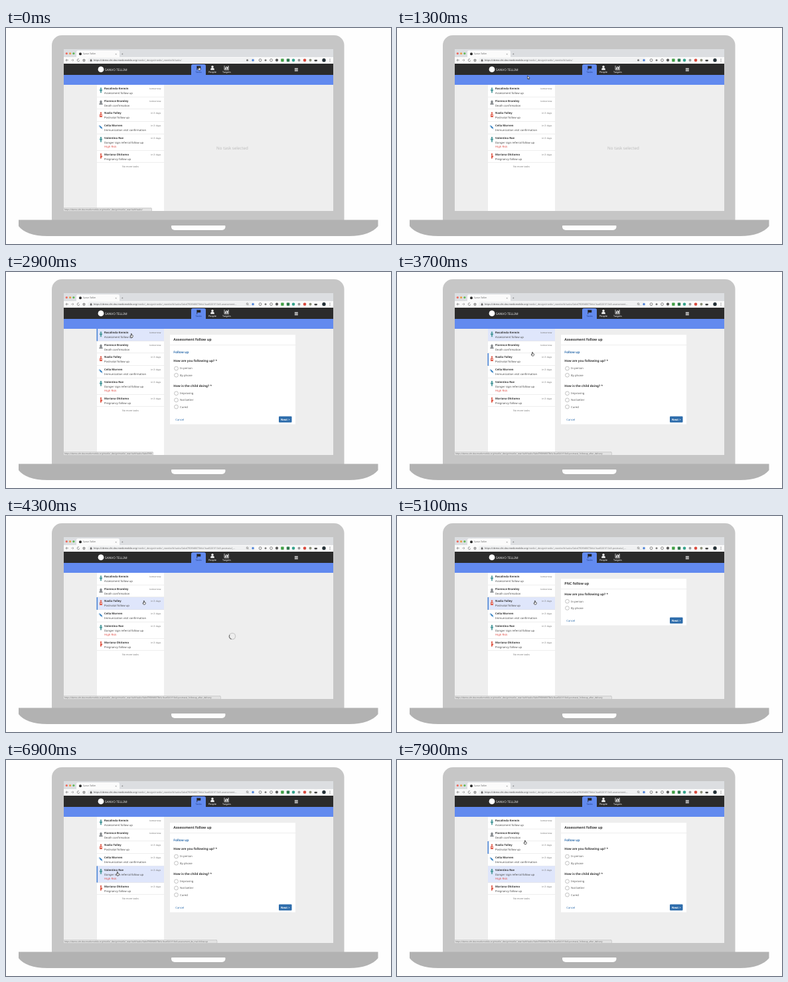
An HTML page with a canvas that plays this animation: 580 px wide and 327 px high, repeating every 8 s.

```html
<!DOCTYPE html>
<html lang="en">
<head>
<meta charset="utf-8">
<title>Task list demo</title>
<style>
html, body { margin: 0; width: 100%; height: 100%; overflow: hidden; background: #fefefe; }
canvas { display: block; width: 580px; height: 327px; }
</style>
</head>
<body>
<canvas id="stage"></canvas>
<script>
const W = 580, H = 327, LOOP = 8000, STEP = 100;
const canvas = document.getElementById('stage');
const dpr = window.devicePixelRatio || 1;
canvas.width = W * dpr;
canvas.height = H * dpr;
const c = canvas.getContext('2d');

const BLUE = '#628aef', LINK = '#2d6cab';
const HOST = 'https://demo-cht.dev.medicmobile.org';
const PATH = '/medic/_design/medic/_rewrite/#/tasks/';
const HASH = '0abd7f08fd8073bfa1bad3201f10c8';

const rows = [
  { y: 86, h: 18.5, name: 'Rosalinda Kerwin', task: 'Assessment follow up', due: 'tomorrow', icon: 'person', color: '#4b9a9c', link: '-assessment-follow-up' },
  { y: 104.5, h: 18.5, name: 'Florence Bramley', task: 'Death confirmation', due: 'tomorrow', icon: 'tomb', color: '#85898d', link: '-death_confirmation' },
  { y: 123, h: 19, name: 'Nadia Tolley', task: 'Postnatal follow up', due: 'in 3 days', icon: 'mother', color: '#e0604f', link: '-postnatal_followup_after_delivery' },
  { y: 142, h: 18.5, name: 'Celia Morven', task: 'Immunization visit confirmation', due: 'in 3 days', icon: 'syringe', color: '#3d86c4', link: '-immunization_visit' },
  { y: 160.5, h: 25, name: 'Valentina Roe', task: 'Danger sign referral follow up', due: 'in 3 days', icon: 'person', color: '#4b9a9c', link: '-assessment_de_mal-follow-up', risk: true },
  { y: 185.5, h: 18.5, name: 'Mariana Okitomo', task: 'Pregnancy follow up', due: 'in 3 days', icon: 'pregnant', color: '#e0604f', link: '-pregnancy_follow_up' }
];

// time, x, y of the pointer
const path = [
  [0, 291, 61], [700, 291, 61], [1300, 198, 75], [1700, 189, 96], [3200, 189, 96],
  [3900, 208, 131], [5200, 208, 131], [5800, 168, 172], [7200, 168, 172], [7900, 193, 124.5]
];

// click time, moment the form is ready, row
const clicks = [
  { at: 2000, ready: 2600, row: 0 },
  { at: 4000, ready: 4700, row: 2 },
  { at: 6200, ready: 6700, row: 4 }
];

function rect(x, y, w, h, fill, r = 0) {
  c.fillStyle = fill;
  c.beginPath();
  c.roundRect(x, y, w, h, r);
  c.fill();
}

function dot(x, y, r, fill) {
  c.fillStyle = fill;
  c.beginPath();
  c.arc(x, y, r, 0, Math.PI * 2);
  c.fill();
}

function ring(x, y, r, color, width, from = 0, to = Math.PI * 2) {
  c.strokeStyle = color;
  c.lineWidth = width;
  c.beginPath();
  c.arc(x, y, r, from, to);
  c.stroke();
}

function line(points, color, width) {
  c.strokeStyle = color;
  c.lineWidth = width;
  c.beginPath();
  points.forEach(([x, y]) => c.lineTo(x, y));
  c.stroke();
}

function shape(points, fill, edge) {
  c.beginPath();
  points.forEach(([x, y]) => c.lineTo(x, y));
  c.closePath();
  c.fillStyle = fill;
  c.fill();
  if (edge) {
    c.strokeStyle = edge;
    c.lineWidth = 0.7;
    c.stroke();
  }
}

// Text is laid out ten times larger so small sizes keep exact spacing.
function text(str, x, y, size, color, { bold = false, align = 'left' } = {}) {
  c.save();
  c.translate(x, y);
  c.scale(0.1, 0.1);
  c.font = `${bold ? 700 : 400} ${size * 10}px "Noto Sans", "Open Sans", sans-serif`;
  c.textRendering = 'geometricPrecision';
  c.textAlign = align;
  c.textBaseline = 'alphabetic';
  c.fillStyle = color;
  c.fillText(str, 0, size * 3.5);
  const width = c.measureText(str).width / 10;
  c.restore();
  return width;
}

function clip(x, y, w, h, draw) {
  c.save();
  c.beginPath();
  c.rect(x, y, w, h);
  c.clip();
  draw();
  c.restore();
}

function pointer(t) {
  let i = path.findIndex(k => k[0] > t);
  if (i < 0) return path[path.length - 1].slice(1);
  const [t0, x0, y0] = path[i - 1], [t1, x1, y1] = path[i];
  const u = (t - t0) / (t1 - t0), e = u * u * (3 - 2 * u);
  return [x0 + (x1 - x0) * e, y0 + (y1 - y0) * e];
}

function laptop() {
  rect(0, 0, W, H, '#fefefe');
  rect(69, 11, 440.5, 280, '#c6c6c6', [15, 15, 0, 0]);
  c.fillStyle = '#b2b2b2';
  c.beginPath();
  c.moveTo(19, 290.5);
  c.lineTo(560.5, 290.5);
  c.lineTo(560.5, 300);
  c.bezierCurveTo(553, 309, 538, 315, 517, 315);
  c.lineTo(62, 315);
  c.bezierCurveTo(41, 315, 26, 309, 19, 300);
  c.fill();
  rect(249, 299, 81.5, 7, '#fefefe', [1, 1, 5, 5]);
}

function browser(selected) {
  rect(87, 32, 406, 12.5, '#dcdee1');
  ['#ed6a5e', '#e8a04a', '#5fb85a'].forEach((col, i) => dot(91.3 + i * 5.3, 38.6, 1.6, col));
  rect(106, 34, 65, 10.5, '#fbfbfb', [2.5, 2.5, 0, 0]);
  dot(112, 39.2, 2, '#2b2b2b');
  text('Sanvo Tellim', 116, 39.2, 3.3, '#555');
  text('×', 164.4, 39.2, 4, '#555');
  text('+', 173.8, 39, 5, '#555');

  rect(87, 44, 406, 10, '#fafafa');
  rect(123, 45, 252, 8, '#f0f1f2', 4);
  const ink = '#555';
  line([[94, 48.7], [90, 48.7]], ink, 0.6);
  line([[91.8, 47], [90, 48.7], [91.8, 50.4]], ink, 0.6);
  line([[98, 48.7], [102, 48.7]], '#888', 0.6);
  line([[100.2, 47], [102, 48.7], [100.2, 50.4]], '#888', 0.6);
  ring(109, 48.7, 1.8, ink, 0.6, 0.2, 5.4);
  line([[115.5, 48.8], [117.5, 46.8], [119.5, 48.8]], ink, 0.6);
  c.strokeRect(116.2, 48.6, 2.6, 2.1);
  rect(126.8, 48.2, 2.6, 2.3, ink);
  ring(128.1, 48.2, 0.9, ink, 0.5, Math.PI, 0);

  const w = text(HOST, 132, 48.7, 3.6, '#444');
  const link = selected ? rows[selected.row].link.slice(0, 11) + '...' : '';
  clip(132, 44, 225, 10, () => text(PATH + (selected ? HASH + link : ''), 132 + w, 48.7, 3.6, '#777'));
  if (selected) {
    ring(363.5, 48.3, 1.3, ink, 0.6);
    line([[364.4, 49.2], [365.5, 50.3]], ink, 0.6);
  } else {
    dot(363.5, 48.7, 1.5, '#777');
  }
  dot(372, 48.7, 1.7, '#4a80d8');

  ring(383, 48.7, 1.9, '#555', 0.7);
  dot(391, 48.7, 1.5, '#777');
  ring(399.5, 48.7, 1.9, '#555', 0.7);
  dot(408, 48.7, 2.1, '#555');
  rect(414.2, 46.5, 4.4, 4.4, '#43a047', 0.7);
  rect(422.8, 46.5, 4.4, 4.4, '#2f7a4d', 0.7);
  dot(433, 48.7, 2.3, '#35a28c');
  dot(441.5, 48.7, 2, '#9a9a9a');
  dot(450, 48.7, 2.3, '#d94a3e');
  dot(458.5, 48.7, 2, '#8a8f78');
  rect(464.5, 48, 4.4, 2.4, '#444', 0.8);
  dot(479, 48.7, 2.7, '#263238');
  [47, 48.7, 50.4].forEach(y => dot(488, y, 0.5, '#555'));
}

function navbar() {
  rect(87, 54, 406, 17.2, '#2b2b2b');
  rect(87, 71, 406, 15, BLUE);
  dot(143, 62.7, 4.4, '#fff');
  text('SANVO TELLIM', 149, 63, 4.8, '#eee');

  rect(279, 55, 22, 17, BLUE, [2.5, 2.5, 0, 0]);
  rect(287.4, 57.3, 0.8, 6.5, '#222');
  rect(288, 57.5, 5.3, 3.9, '#222');
  text('Tasks', 290.2, 66.4, 3.7, '#23418c', { align: 'center' });

  dot(311, 58.8, 1.7, '#fff');
  rect(308.2, 60.4, 5.6, 3.2, '#fff', [2, 2, 0.5, 0.5]);
  text('People', 311, 66.4, 3.7, '#fff', { align: 'center' });

  line([[329, 57], [329, 63.4], [336, 63.4]], '#fff', 0.7);
  [2.8, 4.6, 3.6, 5.3].forEach((h, i) => rect(330 + i * 1.5, 62.6 - h, 1, h, '#fff'));
  text('Targets', 332.3, 66.4, 3.7, '#fff', { align: 'center' });
  [60.8, 62.6, 64.4].forEach(y => rect(434.8, y, 5, 1, '#fff'));
}

function icon(kind, y, col) {
  const x = 143;
  if (kind === 'tomb') {
    rect(x - 1.6, y - 3.2, 3.2, 5, col, [1.6, 1.6, 0, 0]);
    rect(x - 2.6, y + 1.5, 5.2, 1.7, col);
    return;
  }
  if (kind === 'syringe') {
    line([[x - 2.8, y - 2.8], [x + 2.6, y + 2.6]], col, 0.7);
    line([[x - 1.6, y - 1.6], [x + 1.4, y + 1.4]], col, 2.1);
    line([[x - 3, y - 1.6], [x - 1.6, y - 3]], col, 0.7);
    return;
  }
  dot(x, y - 2.9, 1.2, col);
  if (kind === 'mother') {
    rect(x - 2, y - 1.5, 4, 5.2, col, [1.6, 1.6, 0.5, 0.5]);
    dot(x + 0.3, y + 0.8, 0.9, '#fff');
  } else if (kind === 'pregnant') {
    rect(x - 1.1, y - 1.5, 2, 5.4, col, 0.8);
    dot(x + 0.8, y + 0.6, 1.4, col);
  } else {
    rect(x - 2, y - 1.5, 4, 2.5, col, 1);
    rect(x - 1.1, y - 0.8, 0.9, 4.8, col);
    rect(x + 0.2, y - 0.8, 0.9, 4.8, col);
  }
}

function list(selected, hover) {
  rect(137, 86, 101, 191, '#fff');
  rows.forEach((r, i) => {
    if (selected && selected.row === i) rect(137, r.y, 101, r.h, '#dfe6fb');
    rect(137, r.y + r.h - 0.4, 101, 0.5, '#dedede');
    if (hover === i) rect(136.5, r.y, 1.6, r.h, '#4a85d6');
    icon(r.icon, r.y + 8.3, r.color);
    text(r.name, 148, r.y + 5.9, 4.2, '#333', { bold: true });
    text(r.task, 148, r.y + 12.8, 4.2, '#444');
    text(r.due, 233.3, r.y + 6, 3.65, '#777', { align: 'right' });
    if (r.risk) text('High Risk', 148, r.y + 19.3, 4.2, '#df4b43');
  });
  text('No more tasks', 187.5, 209.5, 3.7, '#777', { align: 'center' });
}

function question(str, y, answers) {
  text(str, 252.3, y, 4.7, '#333', { bold: true });
  answers.forEach((a, i) => {
    const ay = y + 11.2 + i * 10.2;
    dot(256.5, ay, 3, '#fff');
    ring(256.5, ay, 2.9, '#999', 0.6);
    text(a, 262, ay, 4.2, '#555');
  });
}

function form(row) {
  const short = row === 2, h = short ? 70.5 : 135.5, end = 95 + h;
  const ways = ['In person', 'By phone'];
  rect(247, 95, 189, h, '#fff');
  rect(247, 110.2, 189, 0.6, '#ddd');
  text(short ? 'PNC follow up' : 'Assessment follow up', 252.3, 102.3, 5.3, '#333', { bold: true });
  if (!short) text('Follow up', 252.3, 121.2, 4.8, LINK, { bold: true });
  question('How are you following up? *', short ? 118 : 134.8, ways);
  if (!short) question('How is the child doing? *', 172.5, ['Improving', 'Not better', 'Cured']);
  text('Cancel', 255.3, end - 7.3, 4.2, LINK);
  rect(411, end - 12, 19.5, 9.3, LINK, 1);
  text('Next >', 420.8, end - 7.3, 4.2, '#fff', { bold: true, align: 'center' });
}

function spinner(t) {
  const a = t / 1000 * Math.PI * 2;
  ring(341, 182, 4.6, '#c9c9c9', 1.3);
  ring(341, 182, 4.6, '#777', 1.3, a, a + 1.7);
}

function status(link, wide) {
  const str = HOST + PATH + link;
  const w = wide ? textWidth(str, 3.2) + 15 : 135;
  rect(87, 272, w, 5, '#b9b9b9', [0, 2, 0, 0]);
  rect(87, 272.4, w - 0.5, 4.6, '#e2e2e2', [0, 2, 0, 0]);
  clip(87, 271, w - 2, 6, () => text(str, 88, 274.7, 3.2, '#666'));
}

function textWidth(str, size) {
  c.font = `400 ${size * 10}px "Noto Sans", "Open Sans", sans-serif`;
  return c.measureText(str).width / 10;
}

function cursor(x, y, hand) {
  const pts = hand
    ? [[-0.6, -2.6], [0.3, -2.6], [0.5, -0.6], [2.2, 0], [2.2, 1.6], [1.4, 3], [-0.8, 3], [-2.2, 0.8], [-1.6, 0.3], [-0.6, 1]]
    : [[-1.4, -2.8], [-1.4, 2.2], [-0.3, 1.3], [0.5, 3], [1.2, 2.7], [0.5, 1], [2.1, 0.9]];
  shape(pts.map(([a, b]) => [x + a, y + b]), '#fff', '#222');
}

function draw(t) {
  const [x, y] = pointer(t);
  const inList = x > 137 && x < 238;
  const hover = inList ? rows.findIndex(r => y >= r.y && y < r.y + r.h) : -1;
  const onTab = x > 279 && x < 301 && y < 86;
  const selected = clicks.filter(k => t >= k.at).pop();

  c.setTransform(dpr, 0, 0, dpr, 0, 0);
  laptop();
  rect(87, 32, 406, 245, '#eee');
  browser(selected);
  navbar();
  list(selected, hover);
  if (!selected) text('No task selected', 341, 182, 6.2, '#bcbcbc', { align: 'center' });
  else if (t < selected.ready) spinner(t);
  else form(selected.row);
  if (onTab) status('', true);
  if (hover >= 0) status(HASH + rows[hover].link, t >= 3300);
  cursor(x, y, onTab || hover >= 0);
}

function tick(now) {
  draw(Math.floor(now % LOOP / STEP) * STEP);
  requestAnimationFrame(tick);
}
requestAnimationFrame(tick);
</script>
</body>
</html>
```
